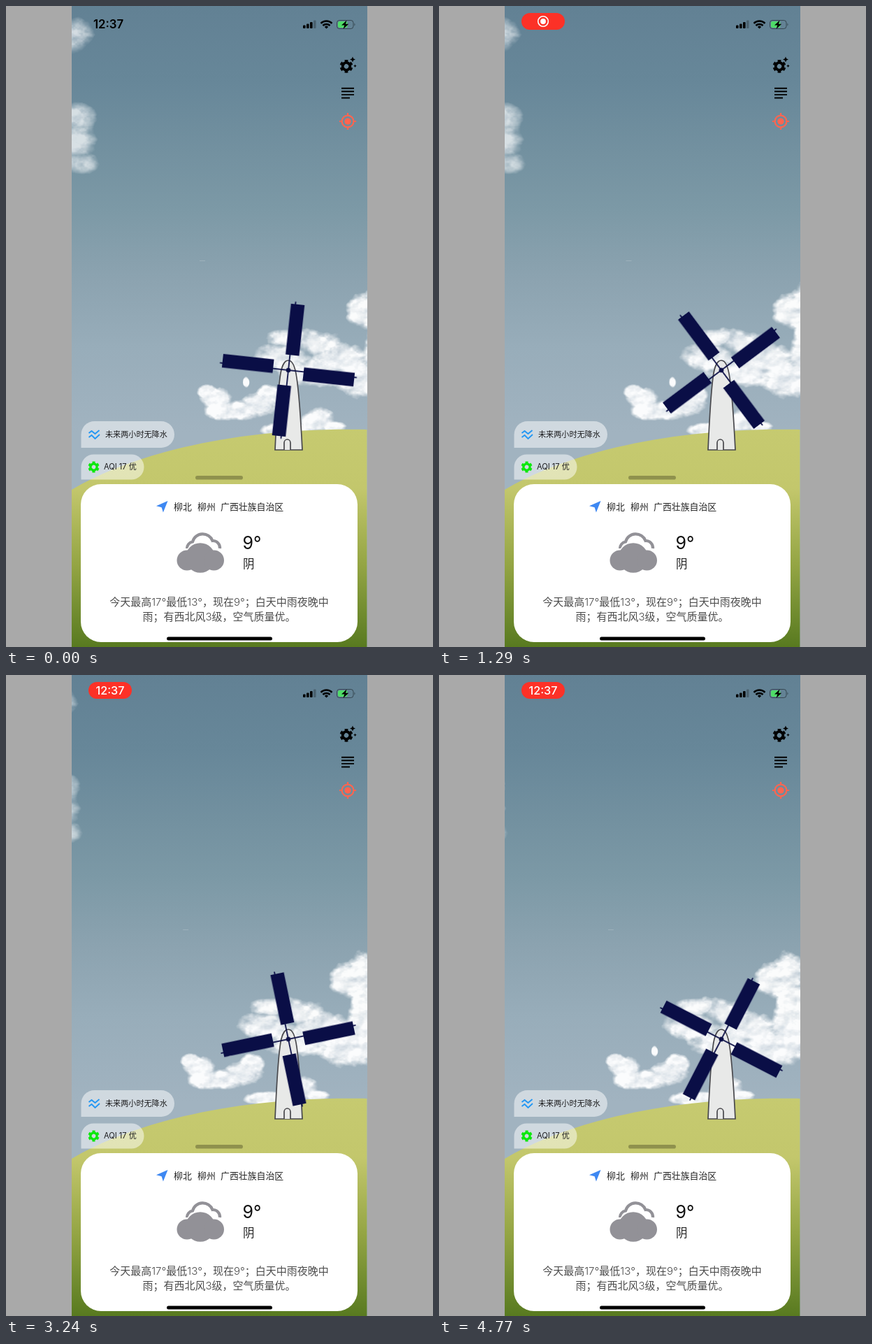
These frames come from a looping animation (611 by 917 pixels, 4.83 s). An HTML page with a canvas:

```html
<!DOCTYPE html>
<html lang="zh-CN">
<head>
<meta charset="utf-8">
<title>天气</title>
<style>
  html, body { margin: 0; width: 100%; height: 100%; overflow: hidden; background: #a9a9a9; }
  #stage { position: relative; width: 611px; height: 917px; overflow: hidden; }
  #sky {
    position: absolute; left: 94px; top: 0; width: 422.5px; height: 917px; overflow: hidden;
    background: linear-gradient(#628194 0, #678799 110px, #7391a0 210px, #7c99a6 290px,
      #8ca3b0 390px, #98adba 490px, #a1b3c0 610px);
  }
  #clouds { position: absolute; left: -94px; top: 0; will-change: transform; }
  svg { position: absolute; left: 0; top: 0; }
  text { font-family: Inter, "Noto Sans CJK SC", "Noto Sans CJK", sans-serif; }
  #mill { transform-origin: 404px 521px; }
</style>
</head>
<body>
<div id="stage">
  <div id="sky"><canvas id="clouds" width="600" height="640"></canvas></div>
  <svg width="611" height="917" viewBox="0 0 611 917">
    <defs>
      <linearGradient id="grass" gradientUnits="userSpaceOnUse" x1="0" y1="606" x2="0" y2="917">
        <stop offset="0" stop-color="#c6ca70"/>
        <stop offset=".27" stop-color="#c3c76c"/>
        <stop offset=".62" stop-color="#94a544"/>
        <stop offset="1" stop-color="#587a20"/>
      </linearGradient>
      <g id="arm" fill="#0a0e46">
        <rect x="403.1" y="422.5" width="1.8" height="98.5"/>
        <rect x="397.6" y="426" width="19.6" height="73"/>
      </g>
      <g id="cog" fill="none" stroke="currentColor" transform="rotate(30)">
        <circle r="5.3" stroke-width="4"/>
        <circle r="8" stroke-width="2.8" pathLength="12" stroke-dasharray="1.1 .9" stroke-dashoffset=".55"/>
      </g>
      <g id="puffs">
        <circle cx="259" cy="793" r="14.5"/>
        <circle cx="278" cy="789.5" r="21.3"/>
        <circle cx="297.5" cy="793" r="14.5"/>
      </g>
    </defs>

    <path d="M94 692C187 637 340 602 516.5 606V917H94Z" fill="url(#grass)"/>

    <g fill="#e8e9e8" stroke="#48484c" stroke-width="1.7">
      <path d="M385 635C387 590 389 555 392 532C394 514 399 507 404 507S413.5 514 416 532C420 560 422 595 424 635Z"/>
      <path d="M398 635V625a4.5 5 0 0 1 9 0V635"/>
    </g>
    <g id="mill">
      <use href="#arm"/>
      <use href="#arm" transform="rotate(90 404 521)"/>
      <use href="#arm" transform="rotate(180 404 521)"/>
      <use href="#arm" transform="rotate(270 404 521)"/>
      <circle cx="404" cy="521" r="3.3" fill="#0a0e46"/>
    </g>

    <!-- chips -->
    <g fill="#fff" fill-opacity=".5">
      <path d="M107.5 632V613a19 19 0 0 1 19-19H222a19 19 0 0 1 0 38Z"/>
      <path d="M107.5 677.5V659.5a18 18 0 0 1 18-18H179.5a18 18 0 0 1 0 36Z"/>
    </g>
    <path d="M118.500 611l4-3 5 4 6-5M118.500 617l4-3 5 5 6.500-6" fill="none" stroke="#2196f3" stroke-width="1.8"/>
    <use href="#cog" transform="translate(125.5 659.5) scale(.86)" color="#0be80b"/>
    <g font-size="11.1" fill="#1c1c1e">
      <text x="142" y="617">未来两小时无降水</text>
      <text x="140" y="663">AQI 17 优</text>
    </g>
    <rect x="271" y="672" width="68" height="5.6" rx="2.8" fill="#8f914d"/>

    <!-- card -->
    <rect x="107" y="684" width="396" height="226" rx="29" fill="#fff"/>
    <path d="M231.5 708L215 715.3l7.6 1.9 2.3 7.3Z" fill="#3e88f2"/>
    <g font-size="12.9" fill="#222">
      <text x="240" y="720.5">柳北</text>
      <text x="274" y="720.5">柳州</text>
      <text x="307" y="720.5">广西壮族自治区</text>
    </g>
    <path d="M259 776A9.500 9.500 0 0 1 267 766.500A15 15 0 0 1 295.500 765A10 10 0 0 1 306 776"
      fill="none" stroke="#929197" stroke-width="4.2"/>
    <use href="#puffs" fill="#fff" stroke="#fff" stroke-width="3"/>
    <use href="#puffs" fill="#929197"/>
    <text x="338.5" y="777" font-size="25" fill="#111">9°</text>
    <text x="339" y="804" font-size="16.5" fill="#222">阴</text>
    <g font-size="15" font-weight="300" fill="#4c4c4c" text-anchor="middle">
      <text x="305" y="858">今天最高17°最低13°，现在9°；白天中雨夜晚中</text>
      <text x="305" y="878.5">雨；有西北风3级，空气质量优。</text>
    </g>
    <rect x="230" y="902.5" width="151" height="5" rx="2.5"/>

    <!-- tools -->
    <use href="#cog" transform="translate(487 86.3)" color="#000"/>
    <path d="M496 72.500l1.200 2.800 2.800 1.200-2.800 1.200-1.200 2.800-1.200-2.800-2.800-1.200 2.800-1.200ZM499.500 83.500l.7 1.600 1.600.7-1.600.7-.7 1.600-.7-1.600-1.600-.7 1.600-.7Z"/>
    <path d="M480 117.700h18M480 122.300h18M480 126.900h18M480 131.500h12" stroke="#000" stroke-width="1.9"/>
    <g fill="none" stroke="#ff6550" stroke-width="2.2">
      <circle cx="489" cy="165" r="8.4"/>
      <path d="M489 153v4M489 173v4M477 165h4M497 165h4"/>
      <circle cx="489" cy="165" r="4.6" fill="#ff6550" stroke="none"/>
    </g>

    <!-- status bar -->
    <rect x="425" y="27.5" width="3.6" height="4.5" rx="1"/>
    <rect x="430" y="25.5" width="3.6" height="6.5" rx="1"/>
    <rect x="435" y="23" width="3.6" height="9" rx="1"/>
    <rect x="440" y="20.5" width="3.6" height="11.5" rx="1" opacity=".25"/>
    <g fill="none" stroke="#000" stroke-width="2.5">
      <path d="M450.500 24.800a11.300 11.300 0 0 1 16 0M453.400 28a7.200 7.200 0 0 1 10.200 0"/>
      <path d="M458.500 32.600l-2.600-2.700a3.700 3.700 0 0 1 5.200 0Z" fill="#000" stroke="none"/>
    </g>
    <rect x="473.5" y="20.5" width="23.5" height="12" rx="3.6" fill="none" stroke="#000" stroke-opacity=".45"/>
    <path d="M498.500 24.500q2 2 0 4Z" opacity=".45"/>
    <rect x="475" y="22" width="13.5" height="9" rx="2.2" fill="#4fdc68"/>
    <path d="M487.500 20.500l-7.500 7h4.300l-1.800 5.500 7.800-7.300h-4.300Z"/>
    <text id="clock" x="146.5" y="32" font-size="16.8" font-weight="600" text-anchor="middle">12:37</text>
    <g id="pill">
      <rect x="118" y="10" width="62" height="24" rx="12" fill="#fc3127"/>
      <g id="rec" fill="none" stroke="#fff" stroke-width="1.6">
        <circle cx="149" cy="22" r="7.3"/>
        <circle cx="149" cy="22" r="3.9" fill="#fff" stroke="none"/>
      </g>
      <text id="time" x="149" y="27.8" font-size="16.2" font-weight="500" fill="#fff" text-anchor="middle">12:37</text>
    </g>
  </svg>
</div>
<script>
const LOOP = 4830;
const byId = id => document.getElementById(id);

// Cloud lobes: x, y, rx, ry
const dim = [
  [96, 44, 24, 24], [98, 160, 26, 18], [102, 192, 24, 26], [105, 224, 26, 14]
];
const bright = [
  [343, 537, 4, 7], [289, 552, 13, 9], [303, 562, 22, 14], [330, 577, 42, 14],
  [362, 571, 30, 15], [376, 558, 16, 14],
  [405, 475, 28, 13], [400, 502, 38, 19], [443, 482, 32, 19], [452, 522, 54, 20],
  [475, 507, 40, 24], [508, 532, 34, 26], [542, 515, 34, 42],
  [513, 438, 24, 23], [537, 428, 22, 32], [547, 462, 28, 24],
  [402, 605, 34, 9], [446, 592, 24, 17], [468, 602, 16, 9]
];

function hash(i, j) {
  const s = Math.sin(i * 127.1 + j * 311.7) * 43758.5453;
  return s - Math.floor(s);
}

function noise(x, y) {
  const i = Math.floor(x), j = Math.floor(y);
  const ease = t => t * t * (3 - 2 * t);
  const mix = (a, b, t) => a + (b - a) * t;
  const u = ease(x - i), v = ease(y - j);
  return mix(
    mix(hash(i, j), hash(i + 1, j), u),
    mix(hash(i, j + 1), hash(i + 1, j + 1), u), v);
}

function fbm(x, y) {
  let sum = 0;
  for (let k = 0, f = 1 / 20, amp = .5; k < 4; k++, f *= 2.1, amp /= 2) {
    sum += amp * noise(x * f * .8 + k * 9, y * f);
  }
  return sum / .94;
}

const clamp = v => Math.min(1, Math.max(0, v));
const ctx = byId('clouds').getContext('2d');

// Lobes give the outline, noise the ragged edge and the shading.
function paint(lobes, x0, y0, w, h, soft, opacity) {
  const img = ctx.createImageData(w, h);
  for (let py = 0; py < h; py++) {
    for (let px = 0; px < w; px++) {
      const x = x0 + px, y = y0 + py;
      let body = 0;
      for (const [cx, cy, rx, ry] of lobes) {
        const dx = (x - cx) / rx, dy = (y - cy) / ry;
        body = Math.max(body, 1 - (dx * dx + dy * dy) / 1.7);
      }
      if (body <= 0) continue;
      const n = fbm(x, y);
      const cover = clamp((body + (n - .5) * 1.1 - .22) / soft);
      const light = clamp(.85 + (n - fbm(x - 3, y - 5)) * 1.6 + (n - .5) * .5);
      const p = (py * w + px) * 4;
      img.data[p] = 180 + 75 * light;
      img.data[p + 1] = 194 + 61 * light;
      img.data[p + 2] = 206 + 49 * light;
      img.data[p + 3] = 255 * opacity * cover;
    }
  }
  ctx.putImageData(img, x0, y0);
}

paint(dim, 94, 0, 60, 270, .75, .72);
paint(bright, 260, 380, 340, 250, .4, .96);
ctx.fillStyle = 'rgba(255,255,255,.18)';
ctx.fillRect(277, 364, 8, 1);

function play(id, frames) {
  byId(id).animate(frames, { duration: LOOP, iterations: Infinity });
}

function fade(id, from, to, start, end) {
  play(id, [
    { opacity: from, offset: 0 },
    { opacity: from, offset: start / LOOP },
    { opacity: to, offset: end / LOOP },
    { opacity: to, offset: 1 }
  ]);
}

play('clouds', [{ transform: 'translateX(0)' }, { transform: 'translateX(-35.5px)' }]);
play('mill', [{ transform: 'rotate(6.2deg)' }, { transform: 'rotate(-154.7deg)' }]);
fade('clock', 1, 0, 60, 180);
fade('pill', 0, 1, 60, 180);
fade('rec', 1, 0, 2480, 2680);
fade('time', 0, 1, 2480, 2680);
</script>
</body>
</html>
```
